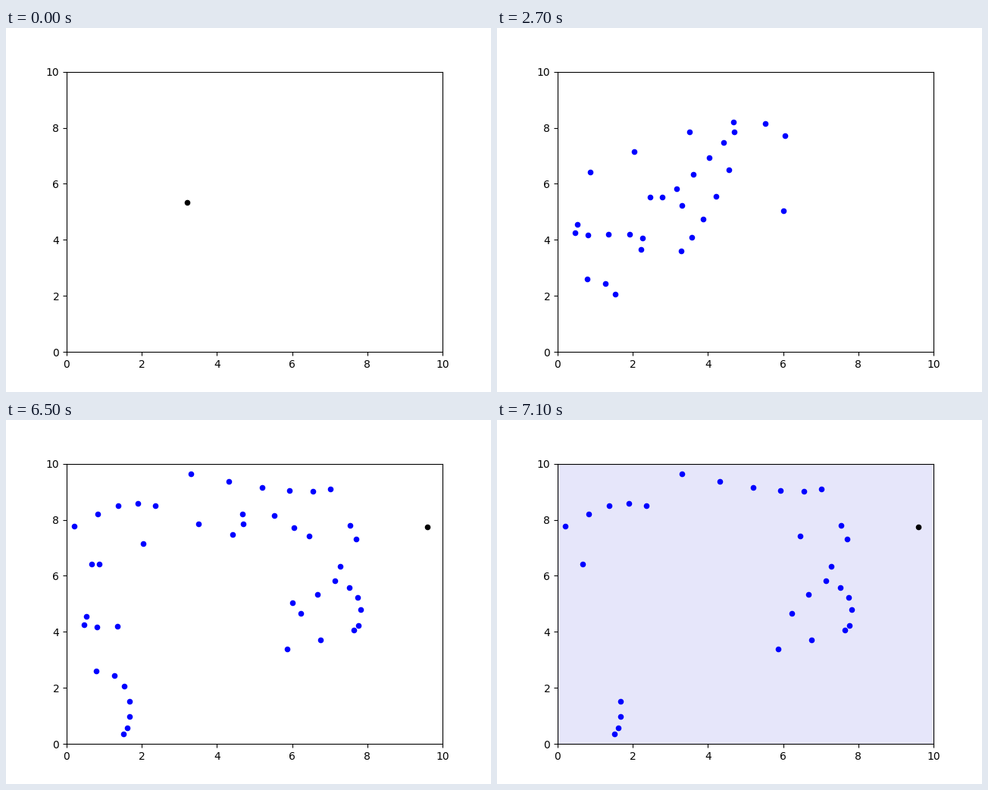
Recreate the animation shown at these times as a matplotlib script. Size 640 by 480 pixels, loop 8000 ms.

```python
import matplotlib.pyplot as plt
from matplotlib.animation import FuncAnimation
import numpy as np

STEP = 100     # ms per frame
LOOP = 8000    # ms per loop
FIRST = 500    # the first ring appears
PERIOD = 2200  # from one ring to the next
FLASH = 1800   # age at which a ring turns cyan until the next one appears
LIFE = 4200    # age at which a ring vanishes
REACH = 2      # longest hop between two neighbours

START = (3.21, 5.33)
GOAL = (9.60, 7.74)
GOAL_SHOWN, GOAL_FOUND = 6500, 6700


def trail(count, *keys):
    """Evenly timed dots on the polynomial curve through the key points."""
    size = len(keys)
    curve = np.polyfit(np.linspace(0, 1, size), keys, size - 1)
    return np.vander(np.linspace(0, 1, count), size) @ curve


DOTS = np.vstack([
    trail(7, (0.53, 4.55), (0.81, 4.18), (1.91, 4.21), (2.21, 3.66)),
    trail(7, (2.46, 5.52), (3.17, 5.83), (4.03, 6.93), (4.69, 7.84)),
    trail(5, (4.56, 6.49), (3.88, 4.74), (3.28, 3.60)),
    trail(2, (3.31, 5.23), (6.01, 5.05)),
    trail(5, (2.03, 7.14), (4.68, 8.19), (6.04, 7.71)),
    trail(2, (0.66, 6.43), (0.87, 6.43)),
    trail(7, (0.79, 2.61), (1.54, 2.05), (1.68, 0.99), (1.52, 0.36)),
    trail(5, (0.21, 7.76), (1.38, 8.49), (2.35, 8.51)),
    trail(6, (3.31, 9.65), (5.58, 9.09), (7.02, 9.09)),
    trail(6, (6.45, 7.41), (7.73, 7.54), (7.08, 5.99), (6.22, 4.65)),
    trail(5, (7.14, 5.83), (7.74, 5.24), (7.76, 4.22)),
    trail(3, (5.86, 3.38), (7.65, 4.06)),
])


def spread(dots, seed):
    """Split the dots into rings by their number of hops from the seed."""
    rings, front = [], np.array([seed])
    while len(dots) and len(front):
        gaps = np.linalg.norm(dots[:, None] - front, axis=2).min(axis=1)
        front, dots = dots[gaps <= REACH], dots[gaps > REACH]
        rings.append(front)
    return rings


fig, ax = plt.subplots(figsize=(6.4, 4.8), dpi=100)
ax.set_xlim(0, 10)
ax.set_ylim(0, 10)


def draw(points, color):
    return ax.scatter(*np.transpose(points), s=20, color=color, zorder=2)


rings = [draw(ring, "blue") for ring in spread(DOTS, START)]
start = draw([START], "black")
goal = draw([GOAL], "black")


def update(frame):
    t = frame * STEP
    for i, ring in enumerate(rings):
        age = t - FIRST - i * PERIOD
        ring.set_visible(0 <= age < LIFE)
        ring.set_color("cyan" if FLASH <= age < PERIOD else "blue")
    start.set_visible(t < FIRST - PERIOD + LIFE)
    goal.set_visible(t >= GOAL_SHOWN)
    ax.set_facecolor("lavender" if t >= GOAL_FOUND else "white")
    return [*rings, start, goal]


anim = FuncAnimation(fig, update, frames=LOOP // STEP, interval=STEP,
                     repeat=True, repeat_delay=0, blit=False)
plt.show()
```
